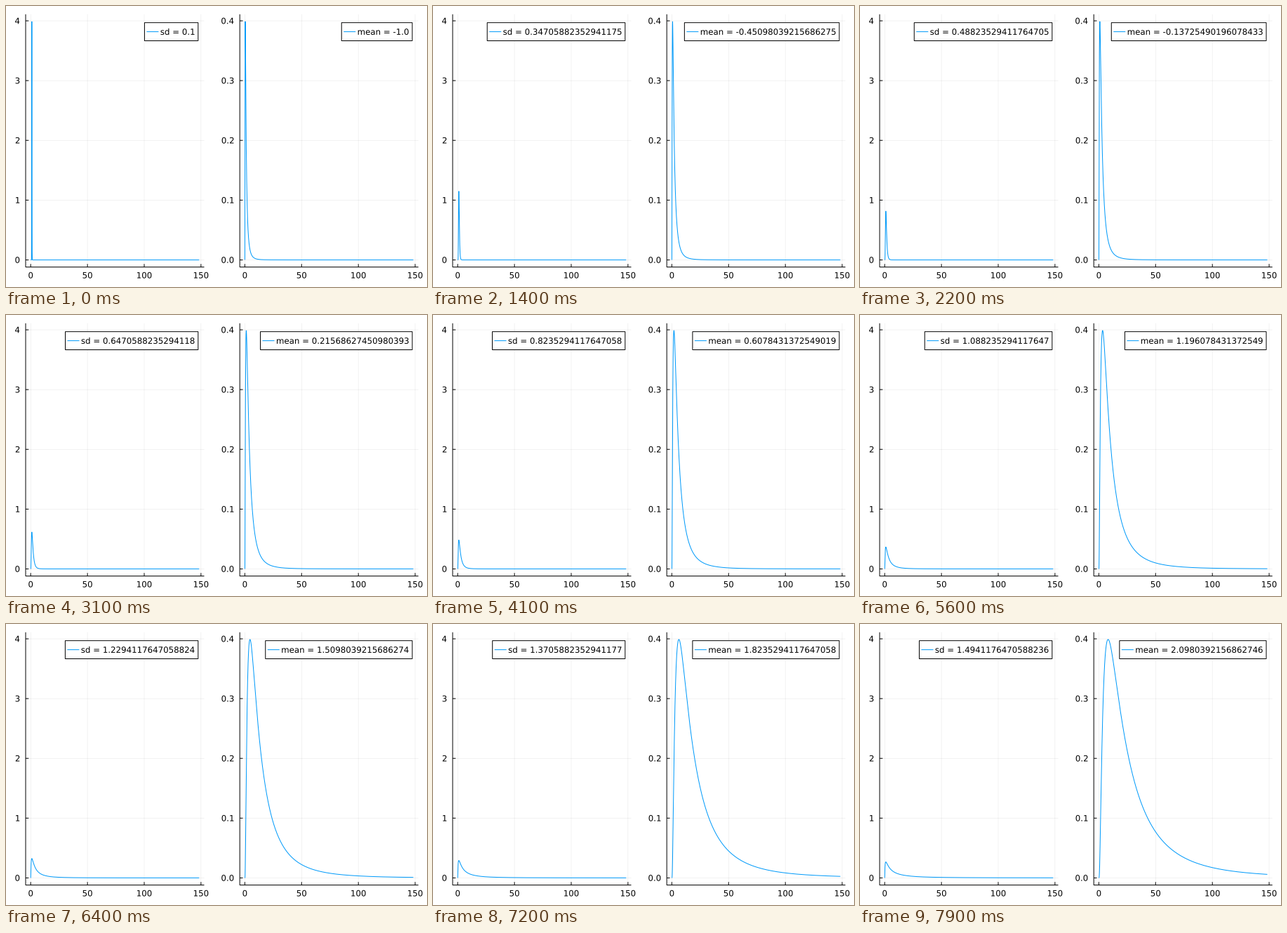
A matplotlib script that plays this animation: 600 by 400 pixels, repeating every 8000 ms.

```python
import numpy as np
import matplotlib.pyplot as plt
from matplotlib.animation import FuncAnimation
from matplotlib.patches import PathPatch, Rectangle
from matplotlib.textpath import TextPath
from matplotlib.transforms import Affine2D

W, H, DPI = 600, 400, 100
PX = 72 / DPI  # points per pixel
FRAMES, INTERVAL = 80, 100
BLUE = "#009AFA"
TOP, BOTTOM, WIDTH = 11.8, 371.6, 254.5
FONT = 11.8
PAD = 0.03  # empty share beyond each end of the data

plt.rcParams.update({
    "font.family": "DejaVu Sans",
    "path.snap": False,
    "lines.linewidth": PX,
    "lines.solid_capstyle": "butt",
    "lines.solid_joinstyle": "miter",
})

fig = plt.figure(figsize=(W / DPI, H / DPI), dpi=DPI, facecolor="white")
ax = fig.add_axes([0, 0, 1, 1])  # pixel coordinates, y down
ax.set_xlim(0, W)
ax.set_ylim(H, 0)
ax.axis("off")
ax.set_autoscale_on(False)

z = np.linspace(-5, 5, 1001)
x = np.exp(z)


def normal_pdf(mean, sd):
    return np.exp(-((z - mean) / sd) ** 2 / 2) / (sd * np.sqrt(2 * np.pi))


def scale(low, high, start, end):
    """Map data to pixels with padding at both ends."""
    unit = (end - start) / ((1 + 2 * PAD) * (high - low))
    return lambda v: start + unit * (v - low + PAD * (high - low))


def glyphs(s, px, cy, align):
    """Outline of s centred on height cy, and the x where it starts."""
    path = TextPath((0, 0), s, size=FONT)
    start = px - align * (path.get_extents().x1 + 0.066 * FONT)
    place = Affine2D().scale(1, -1).translate(start, cy + 0.365 * FONT)
    return path.transformed(place), start


def add_text(s, px, cy, align, zorder=3):
    path, _ = glyphs(s, px, cy, align)
    return ax.add_patch(PathPatch(path, fc="black", lw=0, zorder=zorder))


def line(xs, ys, color="black", **style):
    return ax.plot(xs, ys, color=color, **style)[0]


class Panel:
    """Plot frame with one curve and a legend that grows to the left."""

    def __init__(self, left, peak, step, fmt):
        right = left + WIDTH
        to_x = scale(x[0], x[-1], left, right)
        self.to_y = scale(0, peak, BOTTOM, TOP)
        grid = dict(alpha=0.1, lw=0.5 * PX, zorder=1)

        for value in (0, 50, 100, 150):
            px = to_x(value)
            line([px, px], [TOP, BOTTOM], **grid)
            line([px, px], [BOTTOM, BOTTOM - 4.3], zorder=3)
            add_text(str(value), px, 383.2, 0.5)
        for value in step * np.arange(5):
            py = self.to_y(value)
            line([left, right], [py, py], **grid)
            line([left, left + 4.3], [py, py], zorder=3)
            add_text(fmt % value, left - 8, py, 1)
        line([left, left, right], [TOP, BOTTOM, BOTTOM], zorder=3)

        self.curve = line(to_x(x), np.full_like(x, BOTTOM), BLUE, zorder=2)

        self.edge = right - 8.7
        self.mid = 36.6
        self.box = ax.add_patch(Rectangle((0, self.mid - 12.9), 1, 25.8, fc="white",
                                          ec="black", lw=PX, zorder=4))
        self.key = line([0, 1], [self.mid, self.mid], BLUE, zorder=5)
        self.label = add_text("0", self.edge, self.mid, 1, zorder=6)

    def update(self, text, y):
        self.curve.set_ydata(self.to_y(y))
        path, start = glyphs(text, self.edge - 4.5, self.mid, 1)
        self.label.set_path(path)
        left = start - 22.4
        self.box.set_x(left)
        self.box.set_width(self.edge - left)
        self.key.set_xdata([left + 3, left + 20])


spread = Panel(28.0, 3.98942, 1, "%d")
shift = Panel(333.2, 0.398942, 0.1, "%.1f")


def draw(k):
    sd = (17 + 3 * k) / 170
    mean = (2 * k - 51) / 51
    spread.update(f"sd = {sd}", normal_pdf(0, sd))
    shift.update(f"mean = {mean}", normal_pdf(mean, 1))
    return []


anim = FuncAnimation(fig, draw, frames=FRAMES, interval=INTERVAL,
                     repeat=True, repeat_delay=0, blit=False)
plt.show()
```
